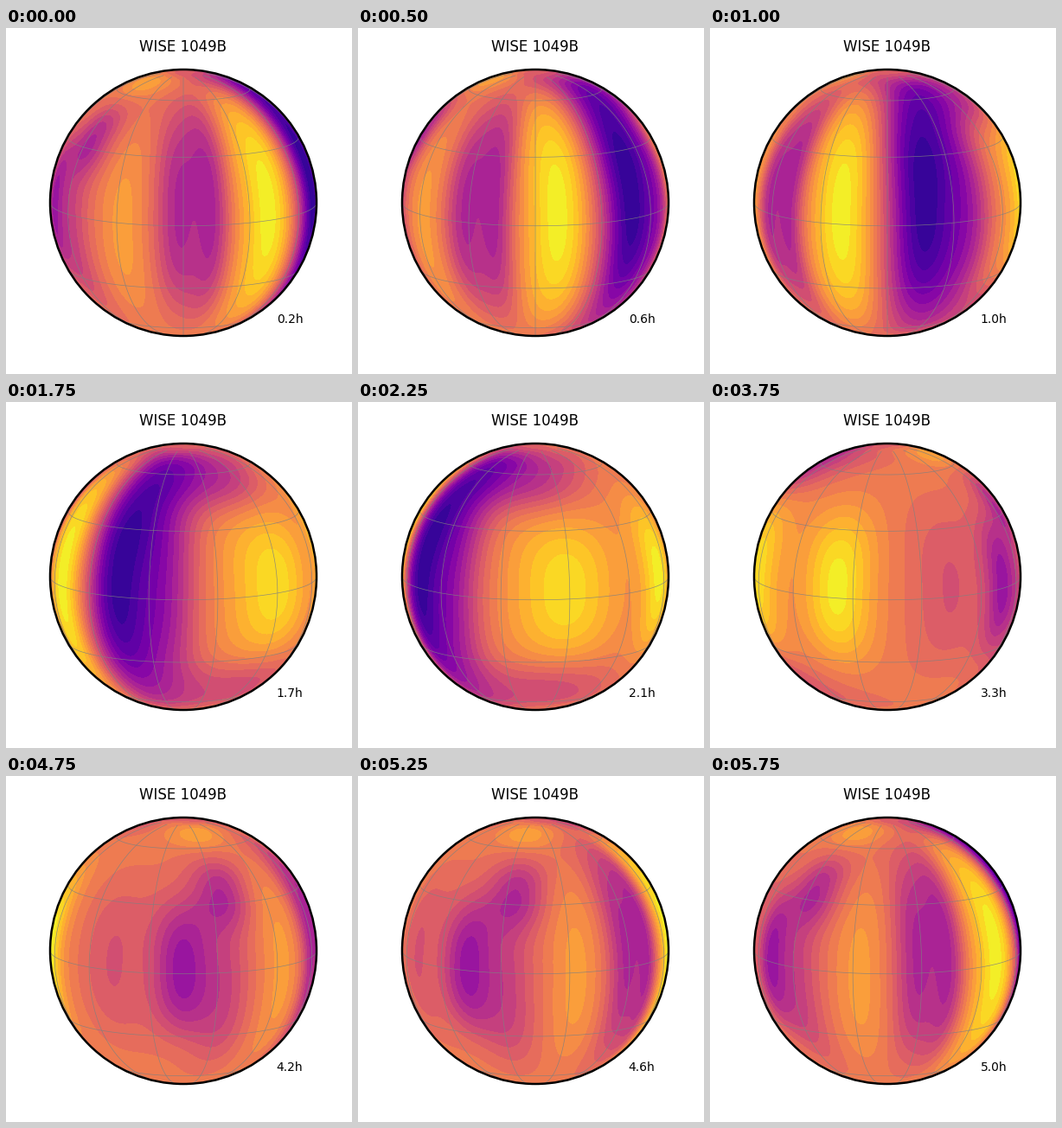
Animation of 400 by 400 pixels, one loop 6000 ms. Source, as a matplotlib script:

```python
import numpy as np
import matplotlib.pyplot as plt
from matplotlib.animation import FuncAnimation
from matplotlib.patches import Circle

plt.rcParams["text.kerning_factor"] = 6

FRAMES = 24
PERIOD_H = 5.0
TILT = np.radians(10)
BASE = 0.67
LEVELS = np.linspace(0, 1, 21)

# longitude, latitude, width, height, strength of each bright or dark spot
SPOTS = [
    (-2, 7, 7.5, 37, -.28), (13, 7, 5.5, 37, -.26), (40, 6, 10, 43, .31),
    (75, 10, 11, 46, -.58), (97, 7, 10, 40, -.30), (148, 4, 17, 25, .265),
    (203, 5, 11, 25, .30), (253, 4, 12, 27, -.125), (284, 2, 9, 23, -.33),
    (303, -8, 9, 30, -.17), (306, 36, 9, 13, -.22), (333, -2, 8, 32, .10),
    (128, 59, 18, 15, -.26), (140, -48, 24, 14, -.16), (303, 71, 10, 8, .11)]


def brightness(lon, lat):
    val = np.full_like(lat, BASE)
    for lon0, lat0, wide, tall, strength in SPOTS:
        across = ((lon - lon0 + 180) % 360 - 180) * np.cos(np.radians(lat)) / wide
        along = np.abs(lat - lat0) / tall
        val += strength * np.exp(-0.5 * (across ** 2 + along ** 2.6))
    return np.clip(val, 0.001, 0.999)


def project(lon, lat):
    lon, lat = np.radians(lon), np.radians(lat)
    x = np.cos(lat) * np.sin(lon)
    depth = np.cos(lat) * np.cos(lon)
    y = np.cos(TILT) * np.sin(lat) - np.sin(TILT) * depth
    z = np.sin(TILT) * np.sin(lat) + np.cos(TILT) * depth
    return np.where(z >= 0, x, np.nan), np.where(z >= 0, y, np.nan)


# latitude and relative longitude of the visible disc
side = np.linspace(-1.01, 1.01, 260)
GX, GY = np.meshgrid(side, side)
r = np.maximum(np.hypot(GX, GY), 1)
px, py = GX / r, GY / r
pz = np.sqrt(np.maximum(1 - px ** 2 - py ** 2, 0))
LAT = np.degrees(np.arcsin(np.clip(py * np.cos(TILT) + pz * np.sin(TILT), -1, 1)))
LON = np.degrees(np.arctan2(px, pz * np.cos(TILT) - py * np.sin(TILT)))

fig, ax = plt.subplots(figsize=(4, 4), dpi=100)


def grid_line(lon, lat):
    x, y = project(lon, lat)
    ax.plot(x, y, color="gray", lw=0.5, alpha=0.85, snap=False)


def draw(i):
    ax.cla()
    ax.set_aspect("equal")
    ax.axis("off")
    ax.set_title("WISE 1049B", fontsize=12, pad=15)

    center = i * 360 / FRAMES
    disc = ax.add_patch(Circle((0, 0), 1, fill=False, ec="black", lw=1.8,
                               clip_on=False, zorder=5))
    field = ax.contourf(GX, GY, brightness(LON + center, LAT),
                        levels=LEVELS, cmap="plasma", vmin=0, vmax=1)
    field.set_clip_path(disc)

    arc = np.linspace(-80, 80, 161)
    for lon in range(0, 360, 30):
        grid_line(lon - center, arc)
    around = np.linspace(-180, 180, 361)
    for lat in range(-60, 61, 30):
        grid_line(around, np.full_like(around, lat))

    hours = (i + 1) * PERIOD_H / FRAMES
    ax.text(0.85, 0.05, f"{hours:.1f}h", fontsize=10, transform=ax.transAxes)
    ax.set_xlim(-1, 1)
    ax.set_ylim(-1, 1)
    return []


anim = FuncAnimation(fig, draw, frames=FRAMES, init_func=lambda: draw(0),
                     interval=250, repeat=True, repeat_delay=0, blit=False)
plt.show()
```
